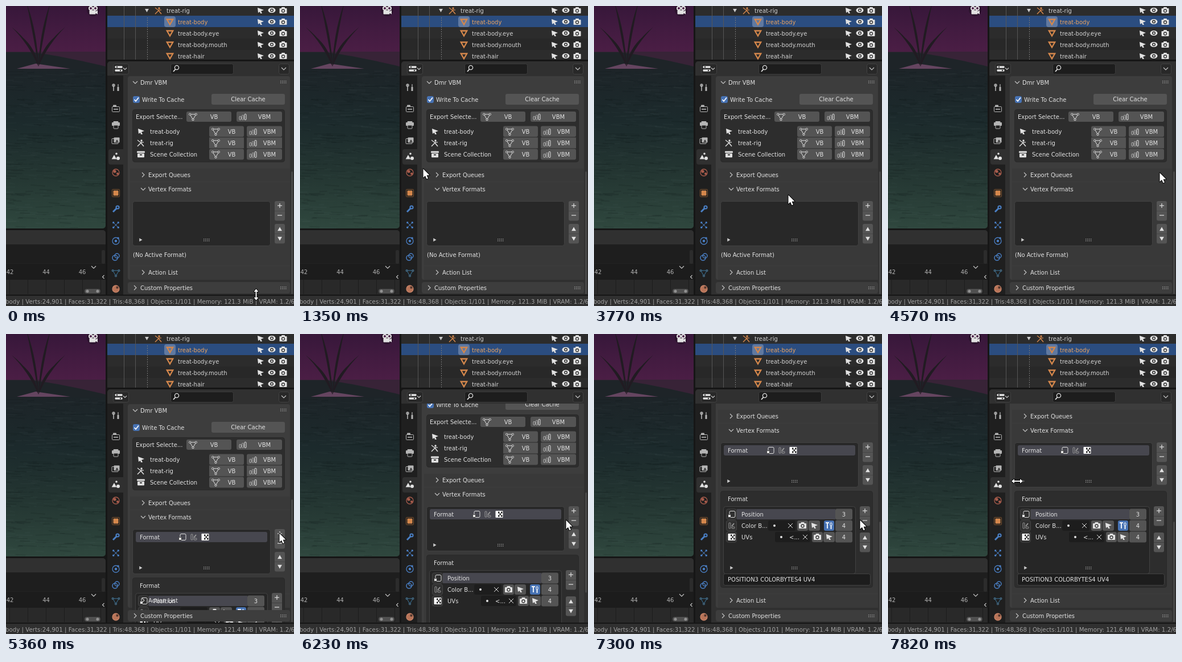
An HTML page with a canvas for the animation above (8 s loop, 506 by 526 pixels).

```html
<!DOCTYPE html>
<html lang="en">
<head>
<meta charset="utf-8">
<title>Properties editor</title>
<style>
html, body { margin: 0; width: 506px; height: 526px; overflow: hidden; background: #161616; }
canvas { display: block; }
</style>
</head>
<body>
<canvas id="stage" width="506" height="526"></canvas>
<script>
const W = 506, H = 526, LOOP = 8000, STEP = 67;
const SANS = '10px "DejaVu Sans", sans-serif';
const STATUS = '10.26px "DejaVu Sans", sans-serif';
const MONO = '10px "DejaVu Sans Mono", monospace';
const LIGHT = '#e2e2e2', GREY = '#b5b5b5', ORANGE = '#d4874c', BLUE = '#4a7fc4', RED = '#a85c4c';
const BUTTON = '#545454', FIELD = '#1d1d1d', EDGE = '#424242', SELECTED = '#47474f';
const DOWN = Math.PI / 2, TURN = 2 * Math.PI;

const screen = document.getElementById('stage').getContext('2d');
const backdrop = document.createElement('canvas');
backdrop.width = W;
backdrop.height = H;
let g = backdrop.getContext('2d');

// Drawing helpers

function paint(fill, stroke, width = 1) {
  if (fill) { g.fillStyle = fill; g.fill(); }
  if (stroke) { g.strokeStyle = stroke; g.lineWidth = width; g.stroke(); }
}
function box(x, y, w, h, fill, r = 3, stroke) {
  g.beginPath();
  g.roundRect(x, y, w, h, r);
  paint(fill, stroke);
}
function block(cx, cy, w, h, fill, stroke) {
  box(cx - w / 2, cy - h / 2, w, h, fill, 1, stroke);
}
function disc(x, y, r, fill, stroke, width = 1.3) {
  g.beginPath();
  g.arc(x, y, r, 0, TURN);
  paint(fill, stroke, width);
}
function corners(n, x, y, r, angle) {
  return Array.from({ length: n }, (_, i) => {
    const a = angle + i / n * TURN;
    return [x + r * Math.cos(a), y + r * Math.sin(a)];
  });
}
function shape(points, fill, stroke, width, open) {
  g.beginPath();
  for (const [x, y] of points) g.lineTo(x, y);
  if (!open) g.closePath();
  paint(fill, stroke, width);
}
const triangle = (x, y, r, angle, fill, stroke, width) => shape(corners(3, x, y, r, angle), fill, stroke, width);
const line = (x1, y1, x2, y2, color = LIGHT, width = 1.2) => shape([[x1, y1], [x2, y2]], null, color, width, true);
function text(s, x, y, color = LIGHT, align = 'left', font = SANS) {
  g.font = font;
  g.textAlign = align;
  g.fillStyle = color;
  g.fillText(s, x, y + 3.7);
}
function chevron(x, y, angle, size = 4) {
  g.save();
  g.translate(x, y);
  g.rotate(angle);
  shape([[-size / 2, -size], [size / 2, 0], [-size / 2, size]], null, '#c8c8c8', 1.1, true);
  g.restore();
}
function grip(x, y) {
  g.fillStyle = '#9c9c9c';
  for (let i = 0; i < 8; i++) g.fillRect(x - 6 + i % 4 * 3, y + (i < 4 ? -2 : 1), 1.4, 1.4);
}
function gradient(y0, y1, ...colors) {
  const fill = g.createLinearGradient(0, y0, 0, y1);
  colors.forEach((c, i) => fill.addColorStop(i / (colors.length - 1), c));
  return fill;
}
const noise = (i, seed) => Math.abs(Math.sin(i * 12.9898 + seed * 78.233) * 43758.5453) % 1;

// Icons

const icon = {
  pointer(x, y) {
    shape([[x - 5, y - 5], [x + 6, y - 1], [x + 1, y + 1], [x + 3, y + 5], [x, y + 5], [x - 1, y + 2], [x - 4, y + 4]], LIGHT);
  },
  eye(x, y) {
    g.beginPath();
    g.ellipse(x, y, 6.5, 4.5, 0, 0, TURN);
    paint(LIGHT);
    disc(x, y, 3, '#2a2a2a');
    disc(x, y, 1.6, LIGHT);
  },
  camera(x, y) {
    block(x, y + .5, 13, 9, LIGHT);
    block(x, y - 4.5, 6, 3, LIGHT);
    disc(x, y + .5, 2.5, LIGHT, '#333');
  },
  mesh(x, y, color = LIGHT) {
    const points = corners(3, x, y - 1, 6.2, DOWN);
    shape(points, null, color, 1);
    for (const [px, py] of points) block(px, py, 3, 3, '#484848', color);
  },
  bars(x, y) {
    for (let i = 0; i < 3; i++) {
      const h = 6 + i * 2;
      box(x - 6.5 + i * 4.5, y + 5.5 - h, 3, h, null, 1, i === 2 ? LIGHT : GREY);
    }
  },
  figure(x, y, color = LIGHT) {
    disc(x + 1, y - 4, 1.7, color);
    line(x - 6, y - 5, x - 1, y - 1, color);
    line(x - 1, y - 1, x + 5, y - 1, color);
    line(x + 1, y - 1, x - 6, y + 6, color, 1.5);
    line(x, y, x + 5, y + 6, color, 1.5);
  },
  collection(x, y) {
    block(x, y - 4, 14, 3, LIGHT);
    block(x, y + 2, 12, 7, LIGHT);
    block(x, y + 1, 4, 2, '#303030');
  },
  vertex(x, y) {
    box(x - 4, y - 5.5, 10, 11, null, 2, LIGHT);
    block(x - 4, y + 3, 5, 5, LIGHT, '#333');
  },
  colors(x, y) {
    block(x - 3.5, y, 3, 10, null, '#999');
    block(x + 2.5, y + 3.5, 5, 3, null, '#999');
    line(x, y + 1, x + 4, y - 4, '#999', 2);
  },
  checker(x, y) {
    block(x, y, 13, 12, '#fff');
    g.fillStyle = '#222';
    for (let i = 0; i < 9; i += 2) g.fillRect(x - 2 + i % 3 * 2.5, y - 4.5 + (i / 3 | 0) * 3, 2.5, 3);
  },
  object: (x, y) => triangle(x, y - 1.5, 6, DOWN, null, ORANGE, 2.3)
};

const tabIcon = {
  tool(x, y) {
    line(x - 4, y - 5, x - 4, y + 6, GREY, 1.6);
    line(x + 4, y - 1, x + 4, y + 6, GREY, 3);
    line(x + 4, y - 6, x + 4, y, GREY);
    disc(x - 4, y - 4, 2, null, GREY);
  },
  render(x, y) {
    block(x, y + 1, 13, 9, null, GREY);
    block(x - 2, y - 5, 6, 3, GREY);
    line(x - 4, y + 1, x + 4, y + 1, GREY, 1.6);
  },
  output(x, y) {
    block(x, y - 1, 14, 6, GREY);
    block(x, y - 5, 9, 2, GREY);
    block(x, y + 4, 8, 6, '#1f1f1f', GREY);
  },
  viewLayer(x, y) {
    block(x - 1.5, y + 1, 11, 9, null, GREY);
    block(x + 1.5, y - 1, 10, 9, GREY);
    triangle(x + 2, y + 1, 3, -DOWN, '#333');
  },
  scene(x, y) {
    triangle(x - 3, y + 2, 5, -DOWN, LIGHT);
    disc(x + 4, y + 3, 3, LIGHT);
    disc(x + 1, y - 5, 1.8, LIGHT);
  },
  world(x, y) {
    disc(x, y, 6, null, RED);
    disc(x - 2, y - 2, 2.6, RED);
    disc(x + 3, y + 2, 2, RED);
  },
  object(x, y) {
    block(x, y, 9, 9, ORANGE);
    block(x, y, 13, 13, null, '#80542f');
  },
  modifier(x, y) {
    line(x - 5, y + 5, x + 2, y - 2, BLUE, 3);
    disc(x + 3, y - 3, 2.6, null, BLUE, 2);
  },
  particles(x, y) {
    for (const [px, py] of corners(4, x, y, 6, TURN / 8)) {
      line(x, y, px, py, BLUE, 1);
      disc(px, py, 1.7, BLUE);
    }
  },
  physics(x, y) {
    disc(x, y, 6, null, BLUE);
    disc(x, y, 2.2, BLUE);
    disc(x + 4, y - 5, 1.8, BLUE);
  },
  constraint(x, y) {
    disc(x - 1.5, y + 1.5, 4.5, null, BLUE, 1.5);
    disc(x + 2, y - 2, 4, null, BLUE, 1.5);
  },
  data: (x, y) => icon.mesh(x, y, '#3c78a0'),
  material(x, y) {
    disc(x, y, 6, '#b87458', '#c98468');
    block(x + 2.5, y - 2.5, 4, 4, '#55382e');
  }
};

// Parts that never change

function leaf(reach, tipY) {
  const x = 57, y = 106, cx = x + reach * .3, cy = (y + tipY) / 2 - 6;
  g.beginPath();
  g.moveTo(x, y);
  g.quadraticCurveTo(cx - 4, cy, x + reach, tipY);
  g.quadraticCurveTo(cx + 4, cy, x, y);
  paint('#211b22');
}
function slope(top, rise, fill) {
  g.beginPath();
  g.moveTo(0, 125);
  for (let x = 0; x <= 175; x += 5) g.lineTo(x, top + rise * Math.max(0, (x - 40) / 135) ** 1.3);
  g.lineTo(175, 125);
  paint(fill);
}
function drawViewport() {
  g.save();
  g.beginPath();
  g.roundRect(-6, -6, 181, 396, 5);
  g.clip();
  g.fillStyle = gradient(0, 82, '#37173a', '#421b40', '#4b1e45');
  g.fillRect(0, 0, 175, 90);
  slope(80, 0, '#382337');
  slope(81, 25, '#1e2428');
  g.fillStyle = gradient(106, 390, '#1d2428', '#1c2a2c', '#243632', '#2f473e');
  g.fillRect(0, 111, 175, 280);
  for (let i = 0; i < 420; i++) {
    const y = 114 + 276 * noise(i, 1), x = 190 * noise(i, 2) - 15, len = 8 + 26 * noise(i, 3);
    line(x, y, x + len, y + 3 * noise(i, 5) - 1, i % 2 ? 'rgba(8,18,22,.13)' : 'rgba(110,145,130,.045)', 1 + 1.5 * noise(i, 4));
  }
  shape([[19, 110], [52, 101], [113, 110]], '#654560');
  for (const side of [-1, 1]) {
    leaf(side * 21, -6);
    leaf(side * 29, 54);
    leaf(side * 47, 37);
  }
  disc(153, 7, 11, 'rgba(25,12,28,.45)');
  block(152, 11, 11, 7, LIGHT);
  triangle(159, 11, 4, Math.PI, LIGHT);
  for (const x of [149, 157]) disc(x, 4, 3, '#4a1c48', LIGHT, 2);
  g.restore();
}
function drawTimeline() {
  box(-6, 393, 181, 113, '#232323', 5);
  box(-6, 393, 181, 25, '#303030', [5, 5, 0, 0]);
  box(0, 418, 175, 33, '#1e1e1e', 0);
  box(0, 452, 175, 28, '#1c1c1c', 0);
  box(0, 480, 175, 26, '#292929', 0);
  for (let i = 0; i < 6; i++) box(6 + i * 32, 480, 1, 25, '#1d1d1d', 0);
  for (let i = 0; i < 3; i++) text(42 + i * 2, 7 + i * 63.5, 466, '#b0b0b0', 'center');
  chevron(154, 458, DOWN);
  box(168, 428, 6, 24, '#2c2c2c', 2);
  chevron(171, 475, Math.PI, 3);
  box(138, 496, 28, 8, '#505050', 4);
  for (const x of [143, 161]) disc(x, 500, 2.6, '#929292');
}
function drawOutliner() {
  box(178, -6, 334, 100, '#282828', [0, 0, 0, 5]);
  const names = ['treat-rig', 'treat-body', 'treat-body.eye', 'treat-body.mouth', 'treat-hair'];
  names.forEach((name, i) => {
    const active = i === 1;
    if (active || i % 2 === 0) box(178, i * 20 - 3, 328, i === 4 ? 17 : 20, active ? '#2b4d80' : '#2c2c2c', 0);
  });
  for (const x of [207, 227]) box(x, 0, 1, 94, '#565656', 0);
  for (let y = 20; y < 94; y += 4) box(248, y, 1, 2, '#777', 0);
  triangle(247.5, 7, 4, DOWN, '#ccc');
  icon.figure(268, 8, ORANGE);
  box(278, 18, 20, 19, 'rgba(255,255,255,.25)', 4);
  names.forEach((name, i) => {
    const y = 8 + i * 20;
    if (i) icon.object(288, y);
    text(name, i ? 302 : 282, y, i === 1 ? '#eba35e' : '#d2d2d2');
    icon.pointer(447, y);
    icon.eye(467, y - .5);
    icon.camera(487, y);
  });
}
function drawTabs() {
  box(178, 122, 28, 384, '#1f1f1f', 0);
  box(180, 251, 27, 27, '#303030', [4, 0, 0, 4]);
  Object.values(tabIcon).forEach((draw, i) => {
    const groupGap = i === 0 ? 0 : i < 6 ? 9 : 17;
    draw(193, 143 + i * 28 + groupGap);
  });
}
function drawHeader() {
  box(178, 97, 334, 409, '#303030', [5, 0, 0, 5]);
  box(188.5, 101.5, 27, 18, '#282828', 3, EDGE);
  for (const side of [-1, 1]) {
    block(198, 110 + side * 3, 13, 3.5, LIGHT);
    disc(198 + side * 3, 110 + side * 3, 1.2, '#333');
  }
  chevron(209, 110, DOWN, 3);
  box(289.5, 101.5, 110, 18, FIELD, 3, '#3c3c3c');
  disc(300, 108, 3.6, null, LIGHT);
  line(297.5, 111, 294, 115, LIGHT, 1.8);
  box(479.5, 101.5, 18, 18, '#282828', 3, EDGE);
  chevron(488, 110, DOWN);
}
function drawBackdrop() {
  g.fillStyle = '#161616';
  g.fillRect(0, 0, W, H);
  drawViewport();
  drawTimeline();
  drawOutliner();
  drawHeader();
  drawTabs();
  box(0, 508, W, 18, '#303030', 0);
}

// Scrolling panel

function button(x, y, w, h, label, glyph, r = 3) {
  box(x, y, w, h, BUTTON, r);
  if (glyph) glyph(label ? x + 11.5 : x + w / 2, y + h / 2);
  if (label) text(label, x + w / 2 + (glyph ? 9 : 0), y + h / 2, LIGHT, 'center');
}
function listButtons(x, y, gap) {
  const cx = x + 9;
  for (const top of [y, y + gap]) {
    box(x, top, 18, 17, BUTTON, [3, 3, 0, 0]);
    box(x, top + 17.5, 18, 17, BUTTON, [0, 0, 3, 3]);
  }
  for (const cy of [y + 8, y + 25]) line(cx - 4, cy, cx + 4, cy);
  line(cx, y + 4, cx, y + 12);
  triangle(cx, y + gap + 10, 4.5, -DOWN, LIGHT);
  triangle(cx, y + gap + 25, 4.5, DOWN, LIGHT);
}
function listFoot(x, y) {
  triangle(x - 1, y, 3.5, 0, '#ccc');
  grip(353, y);
}
function heading(label, x, y, open) {
  chevron(x - 9, y, open ? DOWN : 0);
  text(label, x, y);
}
function drawExport() {
  heading('Dmr VBM', 236, 134, true);
  grip(488, 133);
  box(223, 158, 12, 12, '#4772b3');
  shape([[225.5, 164], [228, 167], [233, 160.5]], null, '#fff', 1.7, true);
  text('Write To Cache', 239, 164);
  button(361, 154, 129, 19, 'Clear Cache');
  box(222.5, 181.5, 267, 92, '#2d2d2d', 4, '#292929');
  text('Export Selecte...', 228, 194);
  button(317, 185, 79, 18, 'VB', icon.mesh);
  button(405, 185, 80, 18, 'VBM', icon.bars);
  const rows = { 'treat-body': icon.pointer, 'treat-rig': icon.figure, 'Scene Collection': icon.collection };
  Object.entries(rows).forEach(([label, glyph], i) => {
    const y = 220 + i * 20;
    glyph(237, y);
    text(label, 253, y);
    button(357, y - 9.5, 61, 19, 'VB', icon.mesh, i === 1 ? 0 : 3);
    button(423, y - 9.5, 62, 19, 'VBM', icon.bars, i === 1 ? 0 : 3);
  });
}
function attributeRow(y, glyph, label, count) {
  box(232.5, y - 9, 18, 18, '#303030', 3, '#454545');
  glyph(242, y);
  text(label, 259, y);
  button(424, y - 9.5, 30, 19, count);
}
function sourceField(x, y, w, value) {
  const end = x + w;
  box(x, y - 9, w, 18, FIELD);
  disc(x + 11, y, 2, LIGHT);
  text(value, x + 25, y);
  for (const side of [-4, 4]) line(end - 9 - side, y - 4, end - 9 + side, y + 4, LIGHT, 1);
  button(end + 3, y - 9, 19, 18, '', icon.camera);
  button(end + 23, y - 9, 20, 18, '', icon.pointer);
}
function drawFormat() {
  box(228, 347, 231, 18, SELECTED);
  text('Format', 235, 356);
  [icon.vertex, icon.colors, icon.checker].forEach((glyph, i) => glyph(310 + i * 20, 356));
  box(222.5, 427.5, 267, 169, '#2d2d2d', 4, '#292929');
  text('Format', 235, 441);
  box(227.5, 454.5, 232, 118, '#262626', 4, EDGE);
  box(251, 459, 173, 18, SELECTED, 0);
  attributeRow(468, icon.vertex, 'Position', '3');
  attributeRow(488, icon.colors, 'Color B...', '4');
  attributeRow(508, icon.checker, 'UVs', '4');
  sourceField(306, 488, 48, '');
  sourceField(318, 508, 62, '<...');
  box(404, 479, 18, 18, '#4772b3');
  line(407, 483, 413, 483, '#fff', 1.8);
  line(410, 483, 410, 493, '#fff', 1.8);
  block(416.5, 485.5, 3, 5, null, '#fff');
  line(416.5, 488, 416.5, 494, '#fff', 1.8);
  listFoot(242, 562);
  listButtons(467, 454, 46);
  box(227.5, 572.5, 258, 20, FIELD, 3, EDGE);
  text('POSITION3 COLORBYTES4 UV4', 235, 582);
}
function drawProperties(scroll, added, drop) {
  g.save();
  g.beginPath();
  g.rect(207, 122, 299, 384);
  g.clip();
  g.translate(0, -scroll);
  box(214, 123, 285, 357 + drop, '#3d3d3d', 4);
  box(218, 285, 281, 23, '#393939', 0);
  box(218, 309, 281, 146 + drop, '#393939', 0);
  box(218, 456 + drop, 281, 24, '#393939', 0);
  drawExport();
  heading('Export Queues', 250, 296);
  heading('Vertex Formats', 250, 321, true);
  box(222.5, 342.5, 242, 78, '#282828', 4, EDGE);
  listFoot(237, 410);
  listButtons(472, 342, 40);
  if (added) drawFormat();
  else text('(No Active Format)', 223, 436);
  g.translate(0, drop);
  heading('Action List', 250, 467);
  box(214, 484, 285, 20, '#3d3d3d', 4);
  heading('Custom Properties', 236, 494);
  grip(488, 494);
  g.restore();

  const view = 383, content = 682 + drop;
  box(501, 122 + (299 + scroll) / content * view, 3, view * view / content, '#484848', 2);
}
function drawTooltip() {
  g.save();
  g.shadowColor = 'rgba(0,0,0,.5)';
  g.shadowBlur = 5;
  box(162, 290, 254, 57, '#1b1b1b', 4);
  g.restore();
  text('Scene Properties', 174, 304, '#d6d6d6');
  text('Python: SpaceProperties.context', 174, 320, '#868686', 'left', MONO);
  text('bpy.data.screens["Layout"] ... context', 174, 332, '#868686', 'left', MONO);
}

// Pointer: each move bends from the previous stop towards "via" and ends at "to"

const moves = [
  { start: 730, end: 1490, via: [250, 300], to: [194, 269] },
  { start: 1560, end: 1620, to: [184, 263] },
  { start: 1820, end: 1890, to: [190, 264] },
  { start: 3560, end: 4300, via: [456, 361], to: [484, 478] },
  { start: 4370, end: 4770, via: [472, 185], to: [480, 349] },
  { start: 5780, end: 5850, to: [467, 326] },
  { start: 7500, end: 7820, to: [179, 244] }
];
function stepped(t, start, end, step = STEP) {
  if (t < start) return 0;
  const count = Math.round((end - start) / step) + 1;
  return Math.min(1, (Math.floor((t - start) / step) + 1) / count);
}
function cursorAt(t) {
  let at = [430, 540];
  for (const { start, end, to, via } of moves) {
    const p = stepped(t, start, end), q = 1 - p;
    at = at.map((from, k) => {
      const bend = via ? via[k] : (from + to[k]) / 2;
      return q * q * from + 2 * p * q * bend + p * p * to[k];
    });
    if (p < 1) break;
  }
  return at.map(Math.round);
}
function outlined(points) {
  g.lineJoin = 'round';
  shape(points, '#fff', '#000', 2);
  shape(points, '#fff');
  g.lineJoin = 'miter';
}
function drawCursor(t) {
  if (t >= 70 && t < 730) return;
  const resizing = t < 70 || t >= 7820;
  const [x, y] = t < 70 ? [439.5, 506] : cursorAt(t);
  g.save();
  g.translate(x, y);
  if (resizing) {
    if (t < 70) g.rotate(DOWN);
    const half = [[-5, 1], [-5, 4], [-10, 0], [-5, -4], [-5, -1]];
    outlined([...half, ...half.map(([px, py]) => [-px, -py])]);
  } else {
    outlined([[.5, .5], [.5, 16], [4, 12.7], [6.5, 18.3], [9, 17.2], [6.6, 11.8], [11.5, 11.5]]);
  }
  g.restore();
}

function draw(t) {
  const added = t >= 5360;
  const drop = 152 * stepped(t, 5440, 5580);
  const notches = (t >= 6230) + 3 * stepped(t, 6510, 6770, 130);
  const memory = t >= 7500 ? '121.6' : added ? '121.4' : '121.3';
  g.drawImage(backdrop, 0, 0);
  drawProperties(Math.min(152, 40 * notches), added, drop);
  text(`body | Verts:24,901 | Faces:31,322 | Tris:48,368 | Objects:1/101 | Memory: ${memory} MiB | VRAM: 1.2/6.0`,
    -1, 518, '#a2a2a2', 'left', STATUS);
  if (t >= 2440 && t < 3160) drawTooltip();
  drawCursor(t);
}
function tick() {
  draw(performance.now() % LOOP);
  requestAnimationFrame(tick);
}
drawBackdrop();
g = screen;
tick();
</script>
</body>
</html>
```
